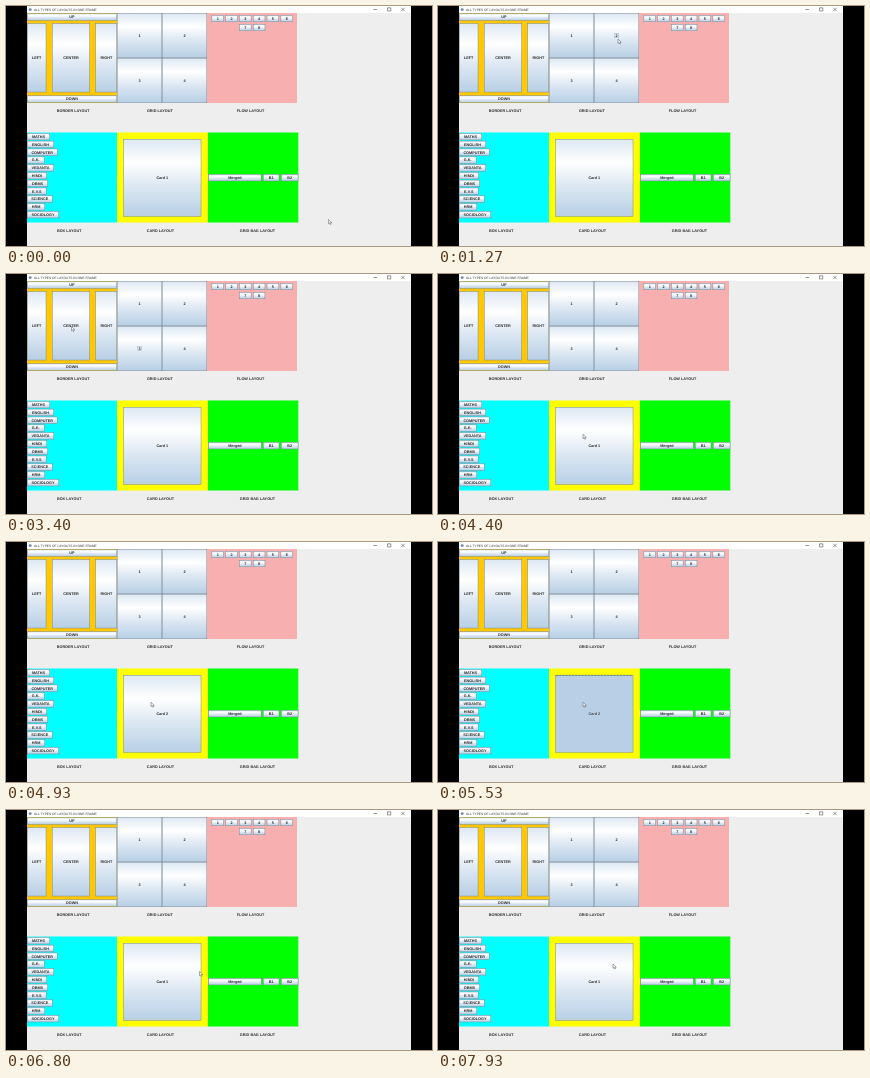
These frames come from a looping animation (426 by 240 pixels, 8 s). An HTML page:

```html
<!DOCTYPE html>
<html lang="en">
<head>
<meta charset="utf-8">
<title>Layouts</title>
<style>
html, body { margin: 0; width: 100%; height: 100%; overflow: hidden; background: #000; }
svg { display: block; width: 100vw; height: 100vh; }
text { font: bold 3.8px "Liberation Sans", Arial, sans-serif; fill: #2c2c2c; text-anchor: middle; text-rendering: geometricPrecision; }
.title { font-weight: normal; font-size: 3.25px; text-anchor: start; }
</style>
</head>
<body>
<svg id="stage" viewBox="0 0 426 240">
  <defs>
    <linearGradient id="steel" x1="0" y1="0" x2="0" y2="1">
      <stop offset="0" stop-color="#dde8f3"/>
      <stop offset=".3" stop-color="#fff"/>
      <stop offset=".6" stop-color="#dde8f3"/>
      <stop offset="1" stop-color="#b8cfe5"/>
    </linearGradient>
  </defs>
</svg>
<script>
const LOOP = 8000;
const stage = document.getElementById('stage');

function add(tag, attrs, content) {
  const el = document.createElementNS('http://www.w3.org/2000/svg', tag);
  for (const key in attrs) el.setAttribute(key, attrs[key]);
  if (content) el.textContent = content;
  stage.appendChild(el);
  return el;
}

function box(x, y, width, height, fill) {
  return add('rect', { x, y, width, height, fill });
}

function label(x, y, content) {
  return add('text', { x, y: y + 1.35 }, content);
}

function button(x, y, w, h, content, cx = x + w / 2) {
  const face = add('rect', {
    x: x + .25, y: y + .25, width: w - .5, height: h - .5,
    fill: 'url(#steel)', stroke: '#7a8a99', 'stroke-width': .5
  });
  return { face, text: label(cx, y + h / 2, content) };
}

function focusRing(x, y) {
  return add('rect', {
    x: x - 1.7, y: y - 2.3, width: 3.4, height: 4.6,
    fill: 'none', stroke: '#8099b8', 'stroke-width': .4
  });
}

// Window
box(21, 0, 384, 240, '#eee');
box(21, 0, 384, 7, '#fff');
add('circle', { cx: 24.2, cy: 3.5, r: 1.5, fill: '#7f93ad' });
add('text', { x: 28, y: 4.6, class: 'title' }, 'ALL TYPES OF LAYOUTS IN ONE FRAME');
add('path', {
  d: 'M367.5 3.5h3.6M381.6 1.8h3.2v3.2h-3.2zM395.3 1.8l3.3 3.3m0-3.3l-3.3 3.3',
  fill: 'none', stroke: '#333', 'stroke-width': .5
});

// Border layout
box(21, 7, 90, 90, '#ffc800');
button(21, 7.5, 90, 7, 'UP');
button(21, 17.3, 19.3, 69, 'LEFT', 30.7);
button(46, 17.3, 38, 69, 'CENTER');
button(89.4, 17.3, 21.6, 69, 'RIGHT', 100.3);
button(21, 89.5, 90, 7, 'DOWN');

// Grid layout
for (let i = 0; i < 4; i++) {
  button(111 + i % 2 * 45, 7 + (i >> 1) * 45, 45, 45, String(i + 1));
}

// Flow layout
box(201, 7, 90, 90, '#f8afaf');
for (let i = 0; i < 8; i++) {
  const row = i < 6 ? 0 : 1;
  const col = row ? i - 4 : i;
  button(205.6 + col * 13.8, 9 + row * 9, 12.2, 7, String(i + 1));
}

// Box layout
box(21, 126.5, 90, 90, '#0ff');
[['MATHS', 23], ['ENGLISH', 27], ['COMPUTER', 30.5], ['G.K.', 17.5],
 ['VEDANTA', 27], ['HINDI', 20], ['DBMS', 21], ['E.V.S', 19.5],
 ['SCIENCE', 25.5], ['HRM', 18], ['SOCIOLOGY', 32]].forEach(([name, w], i) =>
  button(21, 127 + i * 7.8, w, 7.2, name));

// Card layout
box(111, 126.5, 91, 90, '#ff0');
const card = button(117.3, 133, 78, 77.5, 'Card 1');
const cardFocus = add('path', {
  d: 'M118 133.3h76.6', stroke: '#53677d', 'stroke-width': .7, 'stroke-dasharray': '2 1.2'
});

// Grid bag layout
box(202, 126.5, 90.3, 90, '#0f0');
button(202.3, 168, 53.2, 7.2, 'Merged');
button(257, 168, 16.3, 7.2, 'B1');
button(275, 168, 17.3, 7.2, 'B2');

[['BORDER LAYOUT', 67.2, 104.5], ['GRID LAYOUT', 153.8, 104.5], ['FLOW LAYOUT', 244.5, 104.5],
 ['BOX LAYOUT', 63.2, 224.3], ['CARD LAYOUT', 154.4, 224.3], ['GRID BAG LAYOUT', 251.5, 224.3]]
  .forEach(([name, x, y]) => label(x, y, name));

const focusTwo = focusRing(178.5, 29.5);
const focusThree = focusRing(133.5, 74.5);

const pointer = add('path', {
  d: 'M0 0v4.3l1-.9.8 1.6.8-.4-.8-1.5h1.5z',
  fill: '#fff', stroke: '#444', 'stroke-width': .45, 'stroke-linejoin': 'round'
});

// time, x, y
const path = [
  [0, 322.5, 213.5], [200, 322.5, 213.5], [800, 180, 33], [1250, 180, 33],
  [2000, 180.2, 91], [2270, 179.8, 95.5], [2700, 134, 76], [2930, 134, 76],
  [3380, 65.5, 52.5], [3730, 65.5, 52.5], [4400, 145, 160.3], [6330, 145, 160.3],
  [6800, 193.5, 161.5], [7200, 193.5, 161.5], [7930, 175, 154], [LOOP, 175, 154]
];

// time, caption, pressed
const cards = [
  [0, 'Card 1', false], [4800, 'Card 1', true], [4930, 'Card 2', false],
  [5270, 'Card 2', true], [5630, 'Card 3', false], [5970, 'Card 3', true],
  [6100, 'Card 1', false]
];

function pointerAt(t) {
  const i = path.findIndex(p => p[0] > t);
  const [t0, x0, y0] = path[i - 1];
  const [t1, x1, y1] = path[i];
  const u = (t - t0) / (t1 - t0);
  const e = u * u * (3 - 2 * u);
  return [x0 + (x1 - x0) * e, y0 + (y1 - y0) * e];
}

function show(el, on) {
  el.setAttribute('visibility', on ? 'visible' : 'hidden');
}

function render(t) {
  pointer.setAttribute('transform', `translate(${pointerAt(t)})`);
  show(focusTwo, t >= 1270 && t < 2730);
  show(focusThree, t >= 2730 && t < 3530);
  const [, caption, pressed] = cards.filter(c => c[0] <= t).pop();
  card.text.textContent = caption;
  card.text.setAttribute('opacity', pressed ? .8 : 1);
  card.face.setAttribute('fill', pressed ? '#b8cfe5' : 'url(#steel)');
  show(cardFocus, pressed);
}

function tick() {
  render(performance.now() % LOOP);
  requestAnimationFrame(tick);
}
tick();
</script>
</body>
</html>
```
